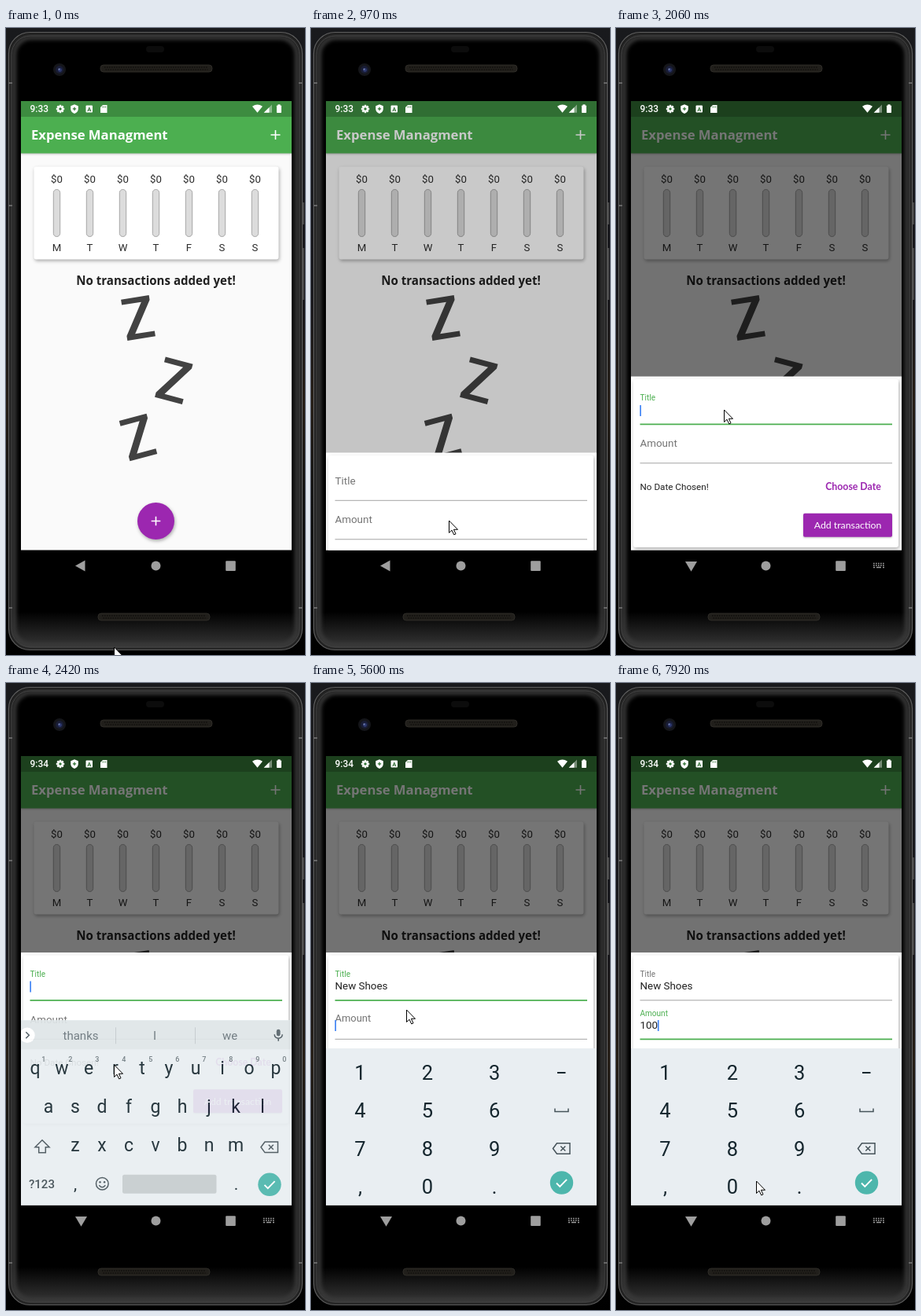
Write an HTML page that moves like this. It is 380 by 798 pixels and loops after 8000 ms.

```html
<!DOCTYPE html>
<html lang="en">
<head>
<meta charset="utf-8">
<title>Expense entry</title>
<style>
html, body { margin: 0; width: 100%; height: 100%; overflow: hidden; background: #000; }
svg { display: block; font-family: Roboto, sans-serif; }
text { white-space: pre; }
.open { font-family: "Open Sans", sans-serif; font-weight: 700; }
.lato { font-family: Lato, sans-serif; }
.card { filter: drop-shadow(1px 2px 2px rgba(0,0,0,.32)); }
.low { filter: drop-shadow(0 1px 1px rgba(0,0,0,.25)); }
.glow { filter: blur(2.5px); }
.line { fill: none; stroke: #46535a; stroke-width: 1.5; }
</style>
</head>
<body>
<svg id="stage" width="380" height="798" viewBox="0 0 380 798"></svg>
<script>
const LOOP = 8000, GREEN = '#4caf50', PURPLE = '#9c27b0', GREY = '#757575', KEY = '#15262e';

// Step tables: each row holds from its time until the next row.
const MOUSE = [
  [0, 137, 788], [380, 143, 764], [500, 157, 698], [610, 170, 645], [730, 175, 627],
  [1460, 168, 600], [1580, 147, 520], [1710, 137, 486],
  [5110, 134, 470], [5230, 124, 430], [5350, 121, 416],
  [5720, 112, 426], [5850, 72, 456], [5970, 32, 484], [6090, 20, 490],
  [6700, 40, 520], [6820, 92, 585], [6950, 146, 629], [7070, 156, 635],
  [7800, 166, 635], [7920, 178, 634]
];
const SHEET = [ // time, top, scrim
  [0, 665, 0], [850, 645, .06], [970, 540.5, .21], [1090, 450, .54], [1210, 443.5, .54], [2300, 343, .54]
];
const TITLE_LABEL = [[0, 0], [1940, .55], [2060, 1]];
const AMOUNT_LABEL = [[0, 0], [5600, .13], [5720, .8], [5850, 1]];
const BOARD = [ // time, opacity, drop
  [0, 0, 0], [2300, .45, 14], [2420, .92, 1.3], [2540, .98, .4], [2660, 1, 0]
];
const TITLE = [ // time, settled text, word being composed
  [0, '', ''], [2910, '', 'N'], [3160, '', 'Ne'], [3280, '', 'New'], [3400, 'New ', ''],
  [3770, 'New ', 'S'], [4010, 'New ', 'Sh'], [4490, 'New ', 'Sho'], [4730, 'New ', 'Shoes'],
  [5600, 'New Shoes', '']
];
const AMOUNT = [[0, ''], [6580, '1'], [7310, '10'], [7800, '100']];
const HINTS = [ // time, three words, middle one bold
  [0, 'thanks', 'I', 'we', 0], [2910, 'N', 'No', 'Not', 1], [3160, 'Ne', 'New', 'Need', 1],
  [3280, 'New', 'News', 'Newer', 1], [3400, 'year', 'one', 'phone', 0],
  [3770, 'S', 'So', 'Shopping', 1], [4010, 'Sh', 'Shoes', 'Show', 1],
  [4490, 'Sho', 'Shoes', 'Show', 1], [4730, 'Shoes', 'Shoes', 'Shoes and', 1]
];
const CARET_OFF = [[4130, 4250], [5230, 5350]];
const PRESSED = [[6580, 6700, 'k1'], [7310, 7430, 'k0'], [7800, 7920, 'k0']];

const at = (table, t) => table.findLast(row => row[0] <= t);
const within = (spans, t) => spans.find(([a, b]) => t >= a && t < b);
const mix = (a, b, p) => a + (b - a) * p;
const txt = (x, y, s, size, fill, extra = '') =>
  `<text x="${x}" y="${y}" font-size="${size}" fill="${fill}" ${extra}>${s}</text>`;
const mid = (x, y, s, size, fill, extra = '') => txt(x, y, s, size, fill, 'text-anchor="middle" ' + extra);
const box = (x, y, w, h, fill, extra = '') =>
  `<rect x="${x}" y="${y}" width="${w}" height="${h}" fill="${fill}" ${extra}/>`;
const disc = (x, y, r, fill, extra = '') => `<circle cx="${x}" cy="${y}" r="${r}" fill="${fill}" ${extra}/>`;
const path = (d, extra = '') => `<path d="${d}" ${extra}/>`;
const group = (id, inner, extra = '') => `<g id="${id}" ${extra}>${inner}</g>`;
const plus = (x, y, r) => path(`M${x - r} ${y}h${2 * r}M${x} ${y - r}v${2 * r}`, 'stroke="#fff" stroke-width="1.6"');
const zed = (x, y, a) => path('M0 0H36V6L11 46H36V53H0V47L25 7H0Z',
  `fill="#424242" transform="translate(${x} ${y}) rotate(${a}) translate(-18 -26.5)"`);
const speaker = (x, y) => box(x, y, 142, 9, '#211f1b', 'rx="4" stroke="#34312c" stroke-width=".8"')
  + path(`M${x + 5} ${y + 3}h132M${x + 6.5} ${y + 6}h130`, 'stroke="#100f0d" stroke-width="1.5" stroke-dasharray="1.6 1.4"');

// Dark metal body: lit edges, a soft inner glow and a paler chin.
const phone = () => box(0, 0, 380, 798, 'url(#desk)')
  + box(3.5, 5.5, 373, 786, '#1b1b1b', 'rx="27" stroke="#626262" stroke-width="1.2"')
  + box(7, 10, 366, 778, '#000', 'rx="24"')
  + box(7, 728, 366, 60, 'url(#chin)', 'rx="24"')
  + box(10, 12, 360, 774, 'none', 'rx="22" stroke="#3a3a3a" stroke-width="6" class="glow"')
  + box(7, 10, 366, 778, 'none', 'rx="24" stroke="#444"')
  + path('M3 70h5M3 226h5M372 70h5M372 738h5M3 738h5', 'stroke="#666" stroke-width="2"')
  + path('M378 222v28M378 280v66', 'stroke="#484848" stroke-width="2"')
  + box(178, 23, 23, 8, '#0c0c0c', 'rx="4"')
  + speaker(120, 47) + speaker(117, 745)
  + disc(68, 53, 8, '#15161a') + disc(68, 53, 5, '#191d35') + disc(68.5, 53.5, 2.4, '#2e3970')
  + disc(67.5, 52.5, .9, '#8792bd');

const chart = () => [...'MTWTFSS'].map((d, i) => {
  const x = 64.5 + 42 * i;
  return mid(x, 196.5, '$0', 13.2, '#2c2c2c') + mid(x, 283.5, d, 13.2, '#2c2c2c')
    + box(x - 4.2, 205.5, 8.4, 60, '#dcdcdc', 'rx="4.2" stroke="#a6a6a6"');
}).join('');

const page = () => box(19, 93, 344, 572, '#fafafa')
  + box(19, 93, 344, 66.5, GREEN, 'class="low"') + box(19, 93, 344, 20, '#3d8c40')
  + txt(32, 142.3, 'Expense Managment', 16.7, '#fff', 'class="open"') + plus(342.5, 136, 6)
  + box(35.5, 176.5, 311, 118, '#fff', 'rx="3" class="card"') + chart()
  + mid(190.5, 326.8, 'No transactions added yet!', 15.07, '#212121', 'class="open"')
  + zed(168, 369, -9) + zed(213.3, 448.7, 15) + zed(168, 521, -15)
  + disc(190.5, 627.5, 23.5, PURPLE, 'class="card"') + plus(190.5, 627.5, 5.8);

const status = () => {
  const teeth = [0, 45, 90, 135].map(a => box(-1.2, -5.2, 2.4, 10.4, '#fff', `transform="rotate(${a})"`)).join('');
  return txt(30.5, 107.2, '9:33', 11.9, '#fff', 'id="clock" font-weight="500"')
    + `<g transform="translate(69 103)">${teeth}${disc(0, 0, 3.8, '#fff')}${disc(0, 0, 1.7, '#36793a')}</g>`
    + path('M87 97.3l4.8 2v3.6c0 3-2 5-4.8 6-2.8-1-4.8-3-4.8-6v-3.6z', 'fill="#fff"')
    + path('M84.8 102.9h4.4M87 100.7v4.4', 'stroke="#3a7a3d" stroke-width="1.4"')
    + box(101.5, 98.5, 8.5, 9, '#fff', 'rx="1"') + mid(105.75, 105.8, 'A', 7.5, '#2f6b32', 'font-weight="700"')
    + path('M123 98h5.5v10h-8.5v-7z', 'fill="#fff"')
    + path('M122.8 99.5v2M124.7 99.5v2M126.6 99.5v2', 'stroke="#3a7a3d" stroke-width=".8"')
    + path('M313 99.8q6.5-4.8 13 0l-6.5 8z', 'fill="#fff"')
    + path('M338 97.5v10.3h-10.3z', 'fill="#fff" opacity=".4"') + path('M334.5 101v6.8h-6.8z', 'fill="#fff"')
    + box(344, 98.5, 6, 9.5, '#fff', 'rx=".8"') + box(345.5, 97.3, 3, 2, '#fff');
};

const sheet = () => box(19, 0, 344, 330, '#fff')
  + box(22, 3.5, 337, 214, '#fff', 'rx="3" class="card"')
  + path('', 'id="titleLine"') + path('', 'id="amountLine"')
  + txt(30.5, 40, 'Title', 13.4, GREY, 'id="titleLabel"') + txt(30.5, 89.5, 'Amount', 13.4, GREY, 'id="amountLabel"')
  + txt(30.5, 47.4, '<tspan id="done"></tspan><tspan id="word" text-decoration="underline"></tspan>', 13.4, '#212121', 'id="titleText"')
  + txt(30.5, 97, '', 13.4, '#212121', 'id="amountText"')
  + box(30, 0, 1.7, 14, '#4285f4', 'id="caret"')
  + txt(30.5, 144.3, 'No Date Chosen!', 11.7, '#212121')
  + mid(301.5, 144.3, 'Choose Date', 12.3, PURPLE, 'class="lato" font-weight="700"')
  + box(238, 174.3, 113, 30, PURPLE, 'rx="2" class="low"')
  + mid(294.5, 193.5, 'Add transaction', 12.3, '#fff', 'class="lato"');

const erase = (x, y) => path(`M${x - 11} ${y}l5-6.8h16.5v13.6h-16.5zM${x - 1.2} ${y - 3}l6 6m0-6l-6 6`, 'class="line"');
const ok = (x, y) => disc(x, y, 14.7, '#4db6ac')
  + path(`M${x - 6.5} ${y + .5}l4.3 4.3 8.8-9`, 'fill="none" stroke="#fff" stroke-width="1.9"');

const keyRow = (keys, x, y) => [...keys].map((k, i) => mid(x + 34 * i, y, k, 23, KEY)).join('');
const letters = () => box(19, 428, 344, 237, '#e9eef1') + box(19, 428, 344, 37, '#dfe5e8')
  + disc(27, 447, 9.7, '#fff') + path('M25.3 443l4 4-4 4', 'class="line"')
  + path('M139.5 437v21M240.5 437v21', 'stroke="#c3c9cd"')
  + [95, 189, 284.5].map((x, i) => mid(x, 452.7, '', 15, '#68747a', `id="hint${i}"`)).join('')
  + box(343.8, 439.5, 4.8, 8.6, '#56636a', 'rx="2.4"')
  + path('M341.2 446c0 6.5 10 6.5 10 0M346.2 451v3.5', 'class="line"')
  + keyRow('qwertyuiop', 37, 496.5) + keyRow('asdfghjkl', 54, 545.5) + keyRow('zxcvbnm', 88, 595)
  + [...'1234567890'].map((n, i) => mid(47.7 + 34 * i, 481, n, 9, '#6a767c', 'font-weight="500"')).join('')
  + path('M46 580.5l9 9h-4.7v7h-8.6v-7H37z', 'class="line"') + erase(335, 589.5)
  + mid(45.5, 642, '?123', 15, '#3d4a51', 'font-weight="500"')
  + mid(88, 643.5, ',', 21, KEY) + mid(292.5, 643.5, '.', 21, KEY)
  + disc(122.3, 636, 7.8, 'none', 'class="line"') + disc(119.5, 634, 1.2, '#46535a') + disc(125.1, 634, 1.2, '#46535a')
  + path('M118.3 638q4 5 8 0', 'class="line"')
  + box(148, 624.5, 119.5, 24, '#c6cccf', 'rx="2.5"') + ok(335, 637);

const digits = () => box(19, 465, 344, 200, '#e9eef2')
  + ['123', '456', '789', ',0.'].map((row, r) => [...row].map((k, c) =>
    mid(62.5 + 85.3 * c, 504.5 + 48.5 * r, k, 25.5, KEY, k >= '0' ? `id="k${k}"` : '')).join('')).join('')
  + path('M313 496h10.5', `stroke="${KEY}" stroke-width="2"`)
  + path('M310 541.5v4h17v-4', 'class="line"') + erase(318.5, 592.5) + ok(318.5, 636);

const dots = () => [681.5, 684, 686.5].map((y, r) =>
  path(r < 2 ? `M327 ${y}h14` : `M327 ${y}h2M331 ${y}h6M339 ${y}h2`,
    `stroke="#9e9e9e" stroke-width="1.5" ${r < 2 ? 'stroke-dasharray="1.7 1.3"' : ''}`)).join('');
const nav = () => path('', 'id="back" fill="#9e9e9e"') + disc(190.5, 684.5, 6, '#9e9e9e')
  + box(279.2, 678.3, 12.6, 12.6, '#9e9e9e', 'rx="1"') + group('ime', dots());

document.getElementById('stage').innerHTML = `<defs>
  <linearGradient id="desk" x1="0" y1="0" x2="0" y2="1">
    <stop offset="0" stop-color="#191a1d"/><stop offset=".42" stop-color="#15151a"/>
    <stop offset=".6" stop-color="#241c14"/><stop offset=".74" stop-color="#101010"/><stop offset="1" stop-color="#000"/>
  </linearGradient>
  <linearGradient id="chin" x1="0" y1="0" x2="0" y2="1">
    <stop offset=".25" stop-color="#000"/><stop offset="1" stop-color="#363636"/>
  </linearGradient>
  <clipPath id="screen">${box(19, 93, 344, 571.4, '#000')}</clipPath></defs>`
  + phone()
  + `<g clip-path="url(#screen)">${page()}${box(19, 93, 344, 572, '#000', 'id="scrim"')}${status()}`
  + group('sheet', sheet()) + group('letters', letters()) + group('digits', digits()) + '</g>'
  + nav()
  + path('M.5 0V15.5L4 12.2 6.7 17.9 9 16.9 6.4 11.3H11.5Z',
    'id="mouse" fill="#fff" stroke="#000" stroke-linejoin="round"');

const el = {};
document.querySelectorAll('[id]').forEach(n => el[n.id] = n);
const set = (id, attrs) => { for (const k in attrs) el[id].setAttribute(k, attrs[k]); };
const show = (id, on) => set(id, { visibility: on ? 'visible' : 'hidden' });
const say = (id, s) => { if (el[id].textContent !== s) el[id].textContent = s; };

function field(id, p, focus, rest, raised, lineY) {
  set(id + 'Label', { y: mix(rest, raised, p), 'font-size': mix(13.4, 10.04, p), fill: focus ? GREEN : GREY });
  set(id + 'Line', {
    d: `M30.5 ${lineY}H351`, stroke: focus ? GREEN : '#a3a3a3', 'stroke-width': focus ? 1.8 : 1
  });
}

function draw(t) {
  const [, mx, my] = at(MOUSE, t), [, top, dim] = at(SHEET, t);
  set('mouse', { transform: `translate(${mx} ${my})` });
  set('scrim', { opacity: dim });
  set('sheet', { transform: `translate(0 ${top})` });
  say('clock', t < 2300 ? '9:33' : '9:34');

  const typing = t >= 1940, onAmount = t >= 5600;
  field('title', at(TITLE_LABEL, t)[1], typing && t < 5720, 40, 30.5, 60.8);
  field('amount', at(AMOUNT_LABEL, t)[1], t >= 5720, 89.5, 80.5, 110.3);
  const [, done, word] = at(TITLE, t);
  say('done', done);
  say('word', word);
  say('amountText', at(AMOUNT, t)[1]);
  const input = el[onAmount ? 'amountText' : 'titleText'];
  set('caret', { x: 30.3 + input.getComputedTextLength(), y: onAmount ? 86 : 36.5 });
  show('caret', typing && !within(CARET_OFF, t));

  const [, alpha, drop] = at(BOARD, t);
  set('letters', { opacity: alpha, transform: `translate(0 ${drop})` });
  show('letters', alpha > 0 && !onAmount);
  show('digits', onAmount);
  const hints = at(HINTS, t);
  for (let i = 0; i < 3; i++) say('hint' + i, hints[i + 1]);
  set('hint1', hints[4] ? { fill: '#000', 'font-weight': 700 } : { fill: '#68747a', 'font-weight': 400 });
  const press = within(PRESSED, t);
  for (const k of ['k0', 'k1']) set(k, { opacity: press && press[2] === k ? .55 : 1 });

  set('back', { d: typing ? 'M88 679h15l-7.5 12.7z' : 'M88 684.5l12.5-7v14z' });
  show('ime', typing);
}

const start = performance.now();
function tick(now) {
  draw(Math.max(0, now - start) % LOOP);
  requestAnimationFrame(tick);
}
draw(0);
requestAnimationFrame(tick);
</script>
</body>
</html>
```
